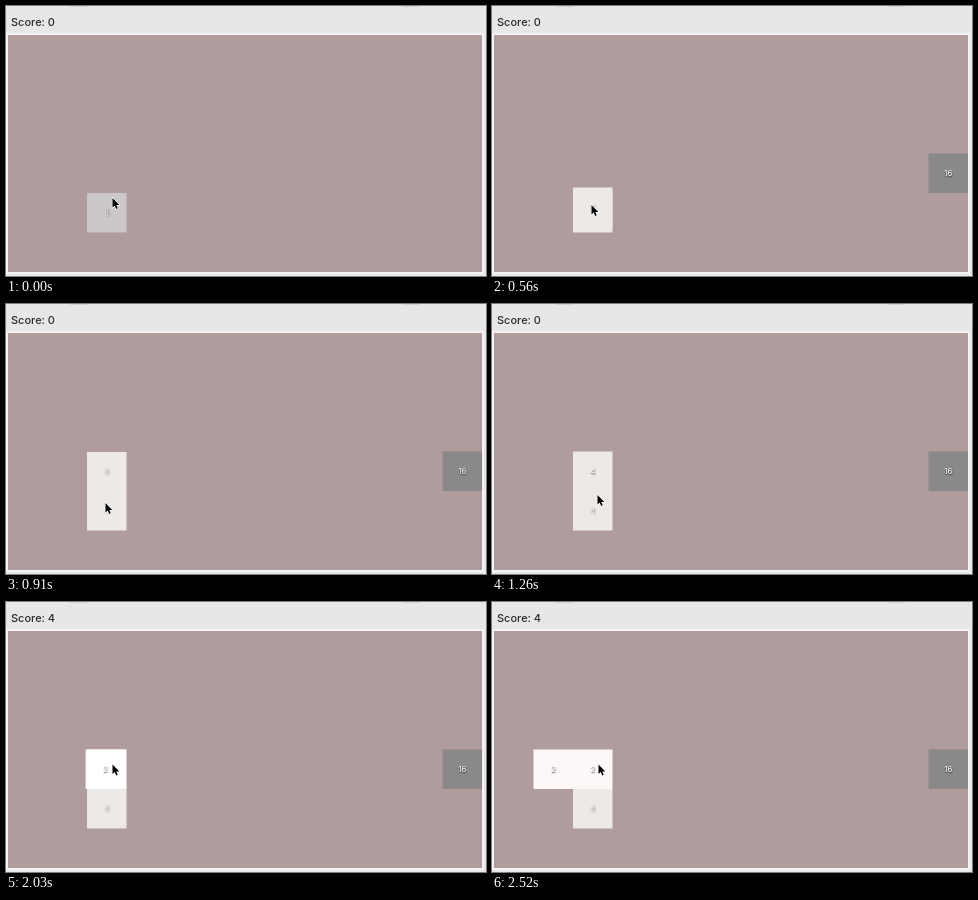
An HTML page with a canvas for the animation above (2590 ms loop, 480 by 270 pixels).

```html
<!DOCTYPE html>
<html lang="en">
<head>
<meta charset="utf-8">
<title>Split tiles</title>
<style>
  html, body { margin: 0; width: 100%; height: 100%; overflow: hidden; background: #e7e7e7; }
  canvas { display: block; }
</style>
</head>
<body>
<canvas id="stage" width="480" height="270"></canvas>
<script>
const ctx = document.getElementById('stage').getContext('2d');
const LOOP = 2590, STEP = 70, CELL = 39.5, LEFT = 2, TOP = 29;
const MOVE_MS = 530, FIRST_SPLIT = 420, SECOND_SPLIT = 1960;
const COLORS = { 2: '#fdf8f7', 4: '#ede9e6', 8: '#ccc7c8', 16: '#8a8888' };

// Pointer path: time, x, y
const PATH = [
  [0, 106.5, 192], [140, 99.5, 199], [1120, 99.5, 199], [1190, 102, 196],
  [1260, 105.5, 191], [1400, 110, 175], [1540, 109, 158.5], [1680, 106.5, 162.5],
  [LOOP, 106.5, 162.5]
];
const ARROW = new Path2D('M0 0V9.6L2.2 7.6L3.7 11L5.2 10.3L3.8 7H6.8Z');

const easeInOut = p => p < 0.5 ? 2 * p * p : 1 - 2 * (1 - p) ** 2;
const progress = (t, start) => easeInOut(Math.min(1, Math.max(0, (t - start) / MOVE_MS)));

function pointerAt(t) {
  const i = PATH.findIndex(point => point[0] > t);
  const [t0, x0, y0] = PATH[i - 1], [t1, x1, y1] = PATH[i];
  const p = (t - t0) / (t1 - t0);
  return [x0 + (x1 - x0) * p, y0 + (y1 - y0) * p];
}

function rect(color, x, y, w, h) {
  ctx.fillStyle = color;
  ctx.fillRect(x, y, w, h);
}

function tile(value, col, row, color = COLORS[value]) {
  const x = LEFT + col * CELL, y = TOP + row * CELL;
  rect(color, x, y, CELL, CELL);
  ctx.save();
  ctx.font = '8px Inter, sans-serif';
  ctx.textAlign = 'center';
  ctx.fillStyle = '#fff';
  ctx.shadowColor = 'rgba(0,0,0,.75)';
  ctx.shadowBlur = 1.5;
  ctx.shadowOffsetX = ctx.shadowOffsetY = 0.4;
  ctx.fillText(value, x + CELL / 2, y + CELL / 2 + 3.2);
  ctx.restore();
}

function drawPage(score) {
  rect('#e7e7e7', 0, 0, 480, 270);
  rect('#d2d2d2', 64, 0, 18, 1);
  rect('#d2d2d2', 396, 0, 17, 1);
  rect('#f4f2f2', 0, 27, 478, 241);
  rect('#b09c9c', LEFT, TOP, 12 * CELL, 6 * CELL);
  ctx.font = '500 11px Inter, sans-serif';
  ctx.fillStyle = '#2b2b2b';
  ctx.fillText('Score: ' + score, 5, 19.5);
}

function drawTiles(t) {
  if (t <= FIRST_SPLIT) return tile(8, 2, 4);
  tile(16, 11, 3);
  tile(4, 2, 4);
  if (t <= SECOND_SPLIT) return tile(4, 2, 4 - progress(t, FIRST_SPLIT));
  const p = progress(t, SECOND_SPLIT);
  const color = `rgb(${255 - 2 * p},${255 - 7 * p},${255 - 8 * p})`;
  tile(2, 2, 3, color);
  tile(2, 2 - p, 3, color);
}

function drawPointer(t) {
  const [x, y] = pointerAt(t);
  const pressed = (t >= 350 && t < FIRST_SPLIT) || (t >= 1750 && t < SECOND_SPLIT);
  if (pressed) {
    ctx.beginPath();
    ctx.arc(x - 0.5, y + 0.5, 15, 0, 2 * Math.PI);
    ctx.strokeStyle = '#111';
    ctx.lineWidth = 1.3;
    ctx.stroke();
  }
  ctx.save();
  ctx.translate(x, y);
  ctx.strokeStyle = '#fff';
  ctx.lineWidth = 1.2;
  ctx.stroke(ARROW);
  ctx.fillStyle = '#000';
  ctx.fill(ARROW);
  ctx.restore();
}

function frame() {
  const t = Math.floor(performance.now() % LOOP / STEP) * STEP;
  drawPage(t > SECOND_SPLIT ? 4 : 0);
  drawTiles(t);
  drawPointer(t);
  requestAnimationFrame(frame);
}
frame();
</script>
</body>
</html>
```
